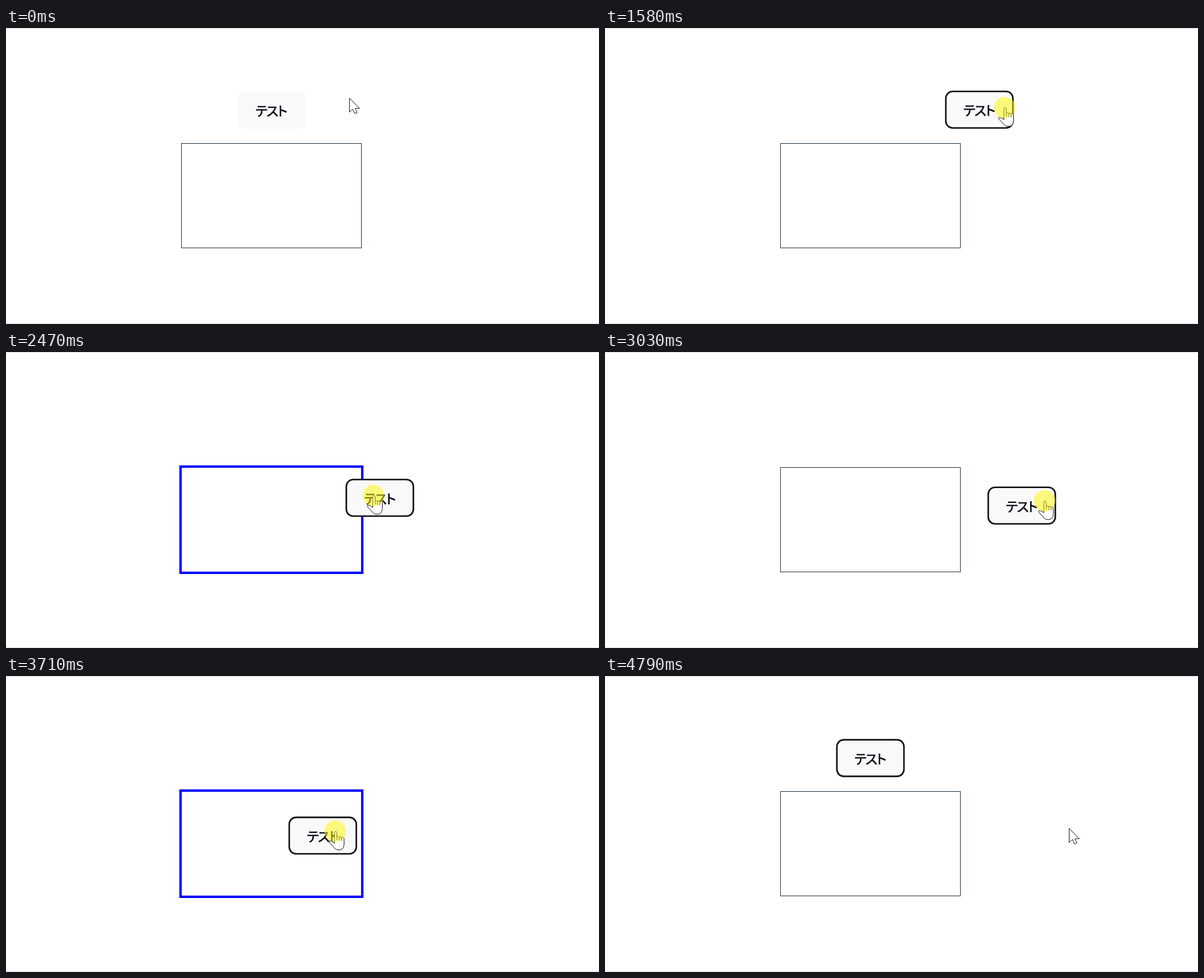
An HTML page that plays this animation: 992x496 px, repeating every 4860 ms.

```html
<!DOCTYPE html>
<html lang="ja">
<head>
<meta charset="utf-8">
<title>Drag and drop</title>
<style>
  html, body { margin: 0; width: 100%; height: 100%; overflow: hidden; background: #fff; }
  svg { display: block; }
  text {
    font: 500 22px "Noto Sans CJK JP", "Noto Sans CJK", sans-serif;
    font-feature-settings: "palt";
    letter-spacing: -1.6px;
    text-anchor: middle;
    fill: #060a14;
    stroke: #060a14;
    stroke-width: .6;
  }
</style>
</head>
<body>
<svg width="992" height="496" viewBox="0 0 992 496" fill="none">
  <path d="M0 .5H992M0 495.5H992" stroke="#dedede"/>
  <rect id="zone" x="293.5" y="193.5" width="301" height="175" stroke="#213547"/>
  <rect id="over" x="292" y="192" width="304" height="178" stroke="#00f" stroke-width="4"/>
  <g id="button">
    <rect width="114" height="63" rx="11.5" fill="#f9f9f9"/>
    <rect id="hover" x=".7" y=".7" width="112.6" height="61.6" rx="11" stroke="#646cff" stroke-width="1.4"/>
    <rect id="focus" x=".9" y=".9" width="112.2" height="61.2" rx="11.5" stroke="#101010" stroke-width="2.6"/>
    <text x="56.5" y="41">テスト</text>
  </g>
  <g id="pointer">
    <path id="arrow" d="M.5 .5V24L6 19L9.5 26.5L13.3 25L10.2 17.7H17.5Z" fill="#fff" stroke="#14143a"/>
    <g id="hand" stroke="#111122">
      <path d="M-1.5 20V2.5Q-1.5 .5 .5 .5T2.5 2.5V9.5Q4.5 7.5 6.5 9.5Q9 8.5 10.5 10.5Q14.5 9.5 14.5 12.5V22Q14 31.5 6 31.5Q0 31.5 -3 26.5L-10.5 18.5Q-10.5 15.5 -7 16.5Z" fill="#fff"/>
      <path d="M2.5 9.5V15M6.5 9.5V15.5M10.5 10.5V16"/>
    </g>
    <circle id="press" r="18" fill="#fff800" fill-opacity=".5"/>
  </g>
</svg>
<script>
const LOOP = 4860, STEP = 68.4, LEAD = 46;
const PRESS = 710, DRAG = 1040, DROP = 4720, LEAVE = 4790;
const HOVER = 250, FADE = 250;

const pt = (x, y) => ({ x, y });
const add = (a, b) => pt(a.x + b.x, a.y + b.y);
const HOME = pt(387, 106), GRAB = pt(80, 24);

// Each leg is one hand movement: an eased curve from the end of the leg before.
const leg = (from, to, bend, end) => ({ from, to, bend, end });
const approach = [leg(30, 420, pt(530, 121), pt(471, 128))];
const drag = [
  leg(1030, 2135, pt(280, -28), pt(272, 76)),
  leg(2135, 2640, pt(250, 108), pt(86, 114)),
  leg(2730, 3180, pt(290, 124), pt(272, 117)),
  leg(3300, 3715, pt(180, 127), pt(84, 130)),
  leg(4150, 4650, pt(200, 130), pt(309, 125))
];

const clamp = v => Math.min(1, Math.max(0, v));
const el = id => document.getElementById(id);
const show = (id, on) => { el(id).style.display = on ? "" : "none"; };
const move = (id, p) => el(id).setAttribute("transform", `translate(${p.x} ${p.y})`);

// Ease in and out, a little slower to start than to stop.
function ease(s) {
  const w = clamp(s) ** 1.15;
  return w * w * (3 - 2 * w);
}

function follow(legs, start, t) {
  return legs.reduce((p, { from, to, bend, end }) => {
    const u = ease((t - from) / (to - from)), v = 1 - u;
    const mix = axis => v * v * p[axis] + 2 * u * v * bend[axis] + u * u * end[axis];
    return pt(mix("x"), mix("y"));
  }, start);
}

function draw(time) {
  const t = Math.floor(time / STEP + .05) * STEP;
  const dragging = time >= DRAG && time < DROP;
  const offset = follow(drag, pt(0, 0), t);
  const button = dragging ? add(HOME, offset) : HOME;
  const pointer = t < DRAG
    ? follow(approach, pt(574, 117), t)
    : add(add(HOME, GRAB), follow(drag, pt(0, 0), t + LEAD));
  const isHand = time < LEAVE && (dragging || time >= DROP || pointer.x < 501);
  const isOver = dragging && button.x < 594 && button.y + 63 > 193;

  move("button", button);
  move("pointer", pointer);
  show("zone", !isOver);
  show("over", isOver);
  show("focus", time >= PRESS);
  show("arrow", !isHand);
  show("hand", isHand);
  show("press", time >= PRESS && time < DROP);
  el("hover").style.opacity = time < PRESS ? clamp((t - HOVER) / FADE) : 0;
}

const start = performance.now();
function tick() {
  draw((performance.now() - start) % LOOP);
  requestAnimationFrame(tick);
}
tick();
</script>
</body>
</html>
```
